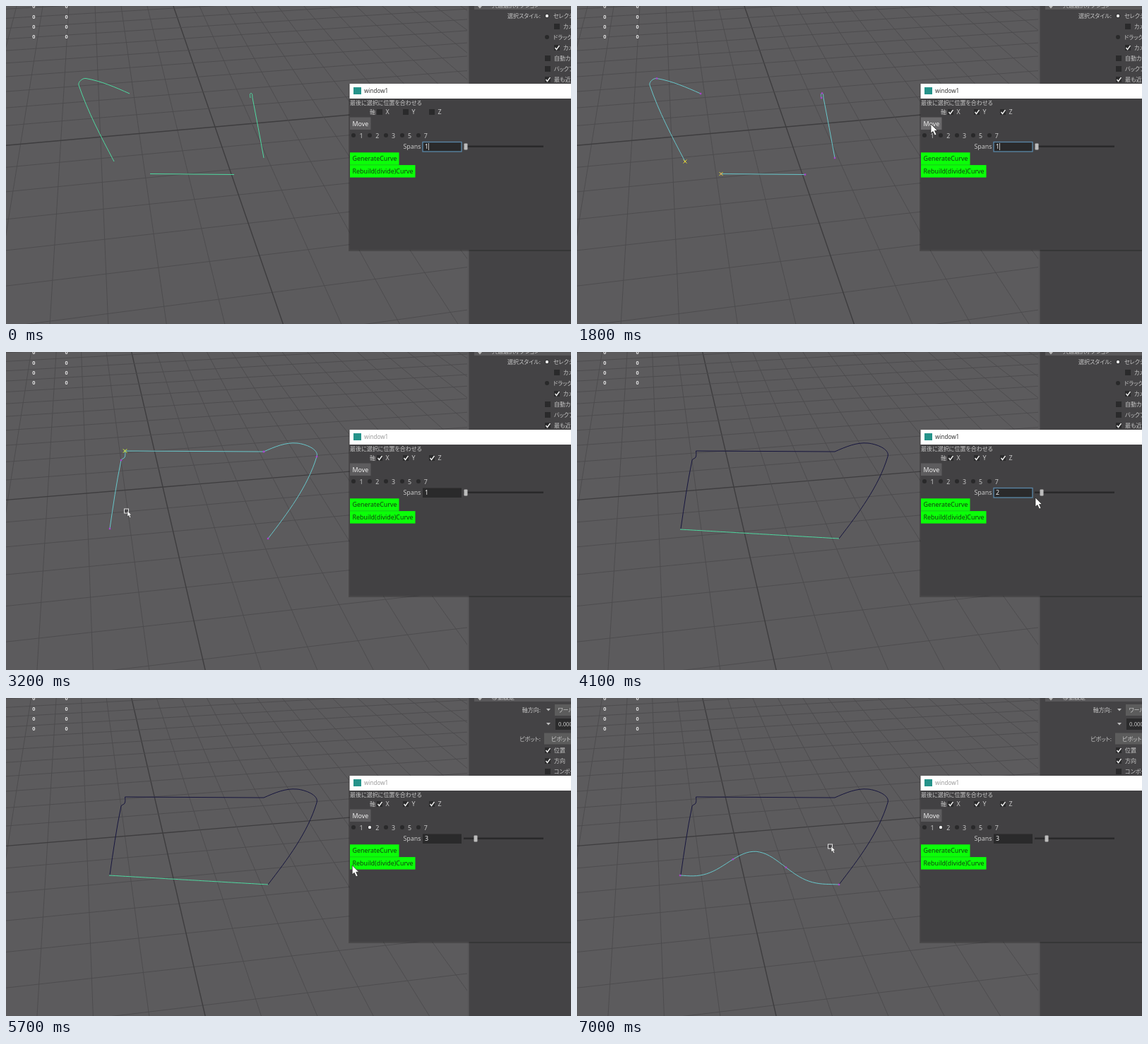
Recreate the animation shown at these times as an HTML page. Size 800 px wide and 450 px high, loop 7.1 s.

```html
<!DOCTYPE html>
<html lang="ja">
<head>
<meta charset="utf-8">
<style>
html, body { margin: 0; width: 100%; height: 100%; overflow: hidden; background: #5c5b5d; }
svg { display: block; width: 800px; height: 450px; }
text { font: 8.9px "Noto Sans", sans-serif; fill: #c6c6c6; white-space: pre; }
.jp { font: 8px "Noto Sans CJK JP", "Noto Sans CJK", sans-serif; font-feature-settings: "palt"; }
.count { font: bold 7.5px "Liberation Sans", sans-serif; fill: #eee; }
.bright { fill: #eee; }
.dark { fill: #123d12; }
</style>
</head>
<body>
<svg id="stage" viewBox="0 0 800 450" xmlns="http://www.w3.org/2000/svg"></svg>
<script>
const LOOP = 7100, STEP = 100, HORIZON = -365, FOCAL = 1040, CELL = 53.5;
const CYAN = '#68c6ca', GREEN = '#4fd8a0', NAVY = '#17163f', YELLOW = '#dfe026', LIME = '#0bff08';
const stage = document.getElementById('stage');

const lerp = (a, b, k) => a + (b - a) * k;
const mix = (a, b, k) => a.map((v, i) => lerp(v, b[i], k));
const ramp = (t, a, b) => Math.max(0, Math.min(1, (t - a) / (b - a)));
const within = (t, a, b) => t >= a && t < b;
const n = v => +v.toFixed(1);

const rect = (x, y, w, h, fill, extra = '') =>
  `<rect x="${n(x)}" y="${n(y)}" width="${w}" height="${h}" fill="${fill}" ${extra}/>`;
const line = (a, b, color, w = 1) =>
  `<line x1="${n(a[0])}" y1="${n(a[1])}" x2="${n(b[0])}" y2="${n(b[1])}" stroke="${color}" stroke-width="${w}"/>`;
const path = (d, color, w = 1, fill = 'none') =>
  `<path d="${d}" fill="${fill}" stroke="${color}" stroke-width="${w}"/>`;
const fillPath = (d, fill) => path(d, 'none', 0, fill);
const dot = (x, y, r, fill, extra = '') =>
  `<circle cx="${n(x)}" cy="${n(y)}" r="${r}" fill="${fill}" ${extra}/>`;
const text = (x, y, s, cls = '', extra = '') => `<text x="${x}" y="${y}" class="${cls}" ${extra}>${s}</text>`;
const at = (x, y, body, scale = 1) => `<g transform="translate(${n(x)} ${n(y)}) scale(${scale})">${body}</g>`;
const poly = (points, color) => path('M' + points.map(p => p.map(n)).join('L'), color);

// camera: centre x, origin x, origin y, yaw in degrees
const camA = [290, 296, 171, -9.77];
const camB = [270, 288, 216, -25.9];
const camC = [255, 222, 191, -8.85];
const view = (t, a, b, c, blend) =>
  t <= 2600 ? blend(a, b, ramp(t, 2400, 2600)) : blend(b, c, ramp(t, 2600, 3200));

function grid([cx, ox, oy, yaw]) {
  const a = yaw * Math.PI / 180, c = Math.cos(a), s = Math.sin(a);
  const ends = [cx + FOCAL * s / c, cx - FOCAL * c / s];
  const project = (u, v) => {
    const w = 1 + CELL / FOCAL * (v * c - u * s);
    return w > 0.15 && [cx + (ox - cx + CELL * (u * c + v * s)) / w, HORIZON + (oy - HORIZON) / w];
  };
  let out = '';
  for (let i = -26; i <= 26; i++) {
    [project(i, 0), project(0, i)].forEach((p, axis) => {
      if (!p) return;
      const far = [ends[axis], HORIZON];
      out += line(far, mix(far, p, 4), i ? '#4c4b4d' : '#3e3d3f', i ? 0.9 : 1.4);
    });
  }
  return out;
}

// smooth line through a few points; handles follow the neighbours
function spline(points) {
  const last = points.length - 1;
  const handle = (i, j) => {
    const a = points[i - 1], b = points[i + 1], p = points[i], q = points[j];
    const k = (j - i) * Math.hypot(q[0] - p[0], q[1] - p[1]) / 3 / Math.hypot(b[0] - a[0], b[1] - a[1]);
    return [p[0] + (b[0] - a[0]) * k, p[1] + (b[1] - a[1]) * k];
  };
  let d = 'M' + points[0].map(n);
  for (let i = 0; i < last; i++) {
    let c1 = i && handle(i, i + 1), c2 = i + 1 < last && handle(i + 1, i);
    c1 = c1 || mix(points[i], c2, 0.5);
    c2 = c2 || mix(points[i + 1], c1, 0.5);
    d += 'C' + [c1, c2, points[i + 1]].map(p => p.map(n)).join(' ');
  }
  return d;
}

// key points: four for the leg, then four for the hook
const poseA = [[346, 130], [347, 123.5], [349, 130], [365, 215], [153, 220], [103, 112], [113, 102.5], [175, 124]];
const poseB = [[216, 295], [211, 203], [204, 194], [191, 183], [381, 160], [438, 141], [478, 157], [437, 271]];
const poseC = [[147, 250], [163, 153], [168, 149], [168.5, 140], [365, 141], [412, 129], [440, 148], [371, 264]];
const barStart = [204, 237.5], barEnd = [323, 238.5];

const cv = p => rect(p[0] - 1.2, p[1] - 1.2, 2.4, 2.4, '#a844cb');
const cross = ([x, y], color, r = 2.5) =>
  path(`M${n(x - r)},${n(y - r)}l${2 * r},${2 * r}m0,${-2 * r}l${-2 * r},${2 * r}`, color);

function curves(t) {
  const pose = view(t, poseA, poseB, poseC, (a, b, k) => a.map((p, i) => mix(p, b[i], k)));
  const tip = pose[3], root = pose[4];
  const from = t < 1900 ? barStart : root, to = t < 2300 ? barEnd : tip;
  const editing = within(t, 400, 3300);
  const color = t < 400 ? GREEN : editing ? CYAN : NAVY;
  let out = path(spline(pose.slice(0, 4)), color) + poly([from, to], color) + path(spline(pose.slice(4)), color);
  if (!editing) return out;
  out += [pose[0], pose[1], tip, root, pose[6], pose[7], from, to].map(cv).join('');
  if (within(t, 600, 2000)) out += cross(root, YELLOW) + cross(from, YELLOW);
  if (t >= 2000) out += cross(to, YELLOW) + cross(tip, '#9be04a');
  return out;
}

// the generated front edge, s runs along it from 0 to 1
const lift = t => within(t, 4800, 5300) ? ramp(t, 4800, 5000) : 0;
const pull = t => ramp(t, 6200, 6700);
const onEdge = (s, rise) => [146 + 225 * s, 251 + 13 * s - rise];

function edge(t) {
  if (t < 3700) return '';
  const chosen = within(t, 4600, 5300) || t >= 5800;
  const hat = s => Math.max(0, 1 - 3 * Math.abs(s - 2 / 3));
  const wave = s => 40 * Math.sin(Math.PI * s ** 0.92) ** 3 - 4 * Math.sin(2 * Math.PI * s) ** 2;
  const point = s => onEdge(s, 61.7 * lift(t) * hat(s) + pull(t) * wave(s));
  const points = Array.from({ length: 49 }, (_, i) => point(i / 48));
  return poly(points, chosen ? CYAN : GREEN) + (chosen ? [0, 16, 32, 48].map(i => cv(points[i])).join('') : '');
}

function arrow(a, b, color) {
  const turn = Math.atan2(b[1] - a[1], b[0] - a[0]) * 180 / Math.PI;
  return line(a, b, color, 1.3)
    + `<path transform="translate(${b}) rotate(${n(turn)})" d="M-14,-3.5L1,0L-14,3.5Z" fill="${color}"/>`;
}

function handle(t) {
  const second = within(t, 6000, 6900);
  if (!second && !within(t, 4800, 5300)) return '';
  const [x, y] = onEdge(2 / 3, 61.7 * lift(t) + 60 * pull(t));
  const tile = (dx, dy, color) => fillPath(`M${dx - 6},${dy - 2.5}l12,-2l0,6.500l-11,1.500Z`, color);
  return at(x - 14 * pull(t), y,
    arrow([1, -10], [1, -64], '#f0ec10')
    + arrow([-3, -13], [-10, -47], second ? '#d6b65e' : '#b01320')
    + arrow([15, -2], [79, -6.5], '#1208d6')
    + tile(38, -34, '#4fc83f')
    + (second ? tile(49, -40, '#c02a36') + dot(25.5, 21, 16, '#9c2f38', 'opacity=".38"')
      : dot(50, -42, 6, '#c03038', 'opacity=".7"'))
    + rect(-7, -7, 14, 14, 'none', `stroke="${CYAN}" stroke-width="1.2"`) + cross([0, 0], '#d8d83c', 3));
}

const checkbox = (x, y, on) =>
  rect(x - 4, y - 4, 8, 8, '#2a2a2b') + (on ? path(`M${x - 2.5},${y}l2,2.500l4,-5.500`, '#eee', 1.4) : '');
const radio = (x, y, on) => dot(x, y, 3, '#29292a') + (on ? dot(x, y, 2.2, '#eee') : '');

function panel(t) {
  const moving = t >= 4700;
  const label = (y, s) => text(757, y, s, 'jp', 'text-anchor="end"');
  const down = (x, y) => fillPath(`M${x - 3},${y}h6l-3,3.500Z`, '#bbb');
  const box = (x, y, w, fill, s, pad) => rect(x, y - 8, w, 16, fill) + text(x + pad, y + 3, s, 'jp');
  // option rows sit 15 px apart; the mark gives kind and state
  const row = (i, x, mark, s) => {
    const y = 14 + 15 * i;
    return (mark < 2 ? checkbox : radio)(x, y, mark % 2) + text(x + 9, y + 3.2, s, 'jp');
  };
  let out = rect(653, 0, 147, 450, '#444345') + rect(653, 0, 2.5, 450, '#5a595b') + rect(663, 0, 137, 5, '#59585a')
    + down(671, 0) + text(688, 1.5, moving ? '移動設定' : '共通選択オプション', 'jp');
  if (moving) {
    out += label(20, '軸方向:') + down(768, 15) + box(777, 17, 23, '#5c5c5c', 'ワールド', 4.5)
      + down(768, 35) + box(778, 37, 22, '#2b2b2c', '0.0000', 4)
      + label(60.5, 'ピボット:') + box(762, 57.5, 38, '#5c5c5c', 'ピボットを編集', 10);
    return out + ['位置', '方向', 'コンポーネント'].map((s, i) => row(4 + i, 767, i < 2 ? 1 : 0, s)).join('');
  }
  return out + label(17, '選択スタイル:') + row(0, 766, 3, 'セレクション') + row(1, 780, 0, 'カメラ')
    + row(2, 766, 2, 'ドラッグ') + row(3, 780, 1, 'カメラ')
    + ['自動カメラ', 'バックフェース', '最も近い'].map((s, i) => row(4 + i, 767, i > 1 ? 1 : 0, s)).join('');
}

function dialog(t) {
  const active = t < 2000 || within(t, 2200, 2400) || within(t, 3700, 4500) || within(t, 5400, 5700);
  const focus = t < 2000 || within(t, 3900, 4500);
  const spans = t < 4000 ? 1 : t < 4200 ? 2 : 3;
  const hover = within(t, 1700, 2000) || within(t, 2200, 2400);
  const button = (y, w, fill, s, cls) => rect(487, y, w, 17.5, fill) + text(490.5, y + 12, s, cls);
  let out = rect(485, 110, 315, 237, '#000', 'opacity=".2"') + rect(486.5, 110, 314, 235, '#424143')
    + rect(486.5, 110, 314, 21, '#fff') + rect(492, 115, 11, 10, '#25938a')
    + text(507, 123.3, 'window1', '', `style="font-size:8.1px;fill:${active ? '#333' : '#9a9a9a'}"`)
    + text(487, 140, '最後に選択に位置を合わせる', 'jp') + text(515, 153, '軸', 'jp');
  ['X', 'Y', 'Z'].forEach((s, i) => {
    out += checkbox(529 + 37 * i, 150, t >= 1000 + 200 * i) + text(537.5 + 37 * i, 153, s);
  });
  [1, 2, 3, 5, 7].forEach((s, i) => {
    out += radio(492 + 23 * i, 183, i === 1 && t >= 5400) + text(500.5 + 22.8 * i, 186.5, s);
  });
  return out + button(157.5, 29.5, hover ? '#6a696b' : '#5d5c5e', 'Move', 'bright')
    + text(562.5, 202, 'Spans') + rect(590, 192.5, 55, 13.5, '#2a2a2b', focus ? 'stroke="#5a87a8" stroke-width="1.3"' : '')
    + text(593, 202.3, spans, 'bright') + (t < 2000 ? line([598.5, 194], [598.5, 204], '#ddd', 0.8) : '')
    + rect(648, 197.5, 113, 2.5, '#29292a') + rect(641.5 + 7 * spans, 194.5, 5, 9, '#bcbcbc', 'rx="1"')
    + button(207.3, 69.5, LIME, 'GenerateCurve', 'dark') + button(225.1, 92.5, LIME, 'Rebuild(divide)Curve', 'dark');
}

// where the pointer arrives, and when
const move = [501, 167], rebuild = [530, 235], orbit = [172, 225], grip = [321, 207];
const visits = [
  [200, [350, 135]], [600, barStart], [1000, [530, 150]], [1400, [604, 150]], [1700, move], [1900, move],
  [2000, barEnd], [2200, move], [2300, move], [2600, orbit], [3200, orbit], [3700, [520, 216]],
  [4100, [649, 206]], [4400, rebuild], [4800, onEdge(2 / 3, 0)], [5000, grip], [5200, grip],
  [5400, [515, 183]], [5600, rebuild], [6200, [291, 246]], [7000, [360, 210]]
];

function pointer(t) {
  if (t < visits[0][0]) return '';
  const i = Math.max(1, visits.findIndex(v => v[0] >= t));
  const [[t0, a], [t1, b]] = [visits[i - 1], visits[i]];
  const [x, y] = mix(a, b, ramp(t, t0, t1));
  if (within(t, 2500, 3200)) {
    return at(x, y, dot(0, 0, 6.5, 'none', 'stroke="#eee" stroke-width="1.3" stroke-dasharray="16 4.42"')
      + rect(-3, -2, 6, 4, '#777', 'stroke="#eee"') + fillPath('M-9,-2h5l-3,-4Z M9,2h-5l3,4Z', '#eee'));
  }
  const pick = x < 486;
  return (pick ? rect(x - 4.5, y - 3, 6, 6, '#48474a', 'stroke="#e4e4e4"') : '')
    + at(x, y, path('M0,0L0,13L3,10.500L5.500,16L8,15L5.500,9.500L9.500,9.500Z', '#222', 0.7, '#fff'), pick ? 0.6 : 1);
}

function draw(t) {
  const cam = view(t, camA, camB, camC, mix);
  let out = rect(0, 0, 800, 450, '#5c5b5d') + grid(cam);
  for (let i = 0; i < 8; i++) out += text(i % 2 ? 83.5 : 37.2, 3.3 + 14.2 * (i >> 1), '0', 'count');
  out += curves(t) + edge(t) + handle(t);
  if (within(t, 2500, 3200)) {
    out += at(cam[1] + 1, cam[2] + 2, dot(0, 0, 5.5, '#8c1820', 'stroke="#d41822" stroke-width="1.5" stroke-dasharray="2 1"')
      + cross([0, 0], '#d41822', 3.5));
  }
  stage.innerHTML = out + panel(t) + dialog(t) + pointer(t);
}

let shown = -1;
function tick() {
  const t = Math.floor((performance.now() % LOOP) / STEP) * STEP;
  if (t !== shown) draw(shown = t);
  requestAnimationFrame(tick);
}
tick();
</script>
</body>
</html>
```
